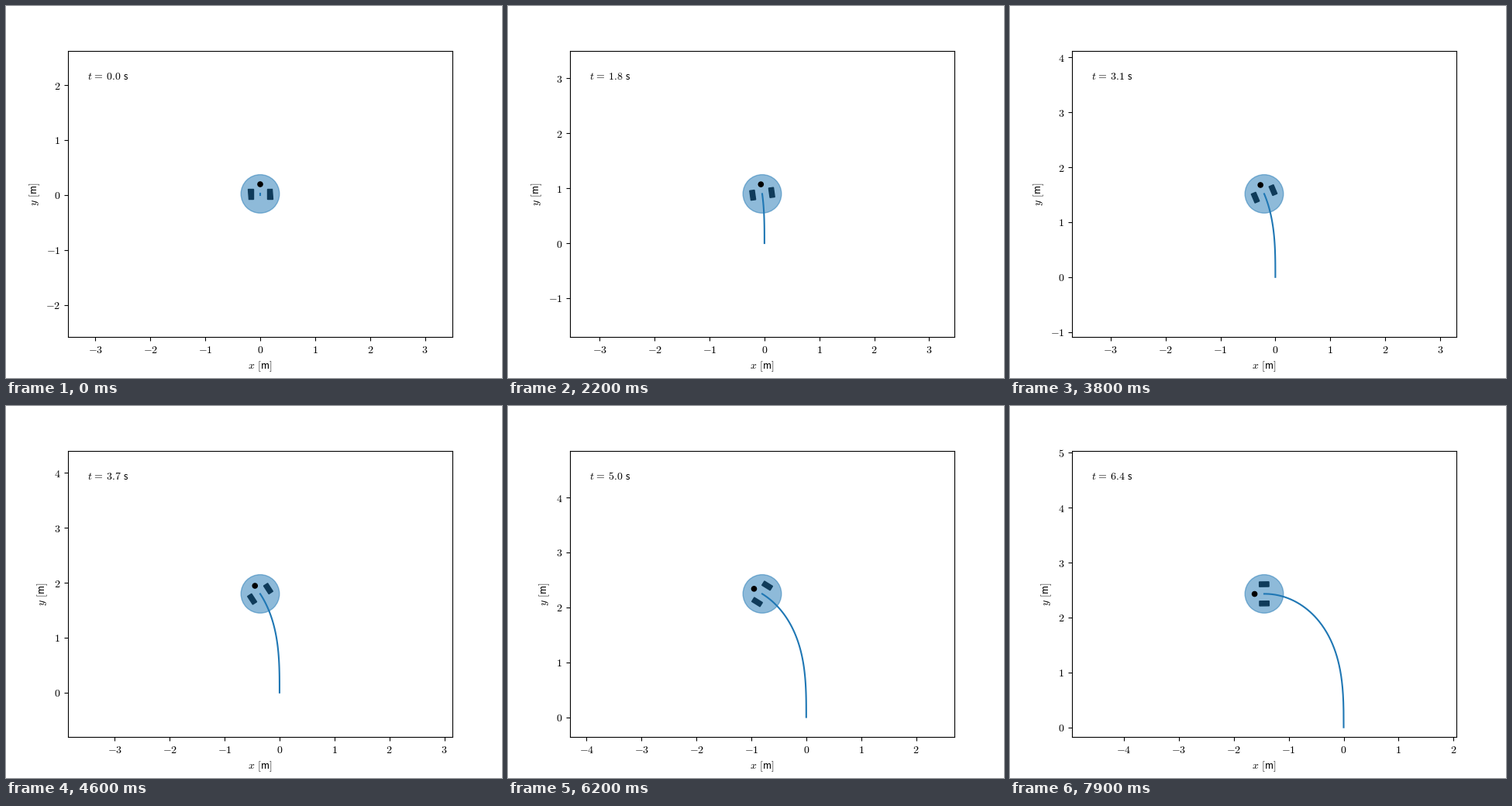
A matplotlib script for the animation above (8000 ms loop, 640 by 480 pixels).

```python
import numpy as np
import matplotlib.pyplot as plt
from matplotlib.animation import FuncAnimation
from matplotlib.patches import Circle, Polygon
from matplotlib.ticker import FuncFormatter, MultipleLocator

plt.rcParams.update({"font.family": "Liberation Sans", "mathtext.fontset": "cm"})

FRAMES, INTERVAL = 80, 100
DT, SPEED = 0.04, 0.5            # step [s], forward speed [m/s]
TURN, FREQ = 0.5, 0.1745         # turn rate = TURN * sin(FREQ * t)
TRACK = 0.35                     # body radius and wheel spacing [m]
HALF_W = 3.5                     # half the visible width [m]
HALF_H = HALF_W * 369.6 / 496

# Unicycle path
time = DT * np.arange(2 * FRAMES)
rate = TURN * np.sin(FREQ * time)
theta = 1e-6 + np.concatenate(([0], np.cumsum(rate[:-1]) * DT))
mid = (theta[1:] + theta[:-1]) / 2
xs = np.concatenate(([0], np.cumsum(-np.sin(mid)) * SPEED * DT))
ys = np.concatenate(([0], np.cumsum(np.cos(mid)) * SPEED * DT))

fig, ax = plt.subplots(figsize=(6.4, 4.8), dpi=100)
ax.set_xlabel(r"$x\hspace{0.38}\mathsf{[m]}$")
ax.set_ylabel(r"$y\hspace{0.38}\mathsf{[m]}$")
for axis in (ax.xaxis, ax.yaxis):
    axis.set_major_locator(MultipleLocator(1))
    axis.set_major_formatter(FuncFormatter(lambda v, _: f"${round(v)}$"))

# Wheel outline in the body frame: heading along +y
WHEEL = np.array([(-1, -1), (1, -1), (1, 1), (-1, 1)]) * (TRACK / 8, TRACK / 4)
SIDES = (-TRACK / 2, TRACK / 2)

wheels = [ax.add_patch(Polygon(WHEEL, fc="k", ec="k")) for _ in SIDES]
body = ax.add_patch(Circle((0, 0), TRACK, color="C0", alpha=0.5))
nose = ax.add_patch(Circle((0, 0), TRACK / 8, color="k"))
trail, = ax.plot([], [], "C0", lw=1.5)
clock = ax.text(0.05, 0.9, "", transform=ax.transAxes)


def update(n):
    k = 2 * n + 1
    pos = np.array([xs[k], ys[k]])
    c, s = np.cos(theta[k]), np.sin(theta[k])
    rot = np.array([[c, s], [-s, c]])

    for wheel, side in zip(wheels, SIDES):
        wheel.set_xy((WHEEL + (side, 0)) @ rot + pos)
    body.center = tuple(pos)
    nose.center = tuple(np.array([0, TRACK / 2]) @ rot + pos)
    trail.set_data(xs[:k + 1], ys[:k + 1])
    clock.set_text(r"$t\hspace{0.12}=\hspace{0.18}\mathsf{%.1f}"
                   r"\hspace{0.38}\mathsf{s}$" % time[k])
    ax.set_xlim(pos[0] - HALF_W, pos[0] + HALF_W)
    ax.set_ylim(pos[1] - HALF_H, pos[1] + HALF_H)
    return [*wheels, body, nose, trail, clock]


anim = FuncAnimation(fig, update, frames=FRAMES, interval=INTERVAL,
                     repeat=True, repeat_delay=0, blit=False)
plt.show()
```
